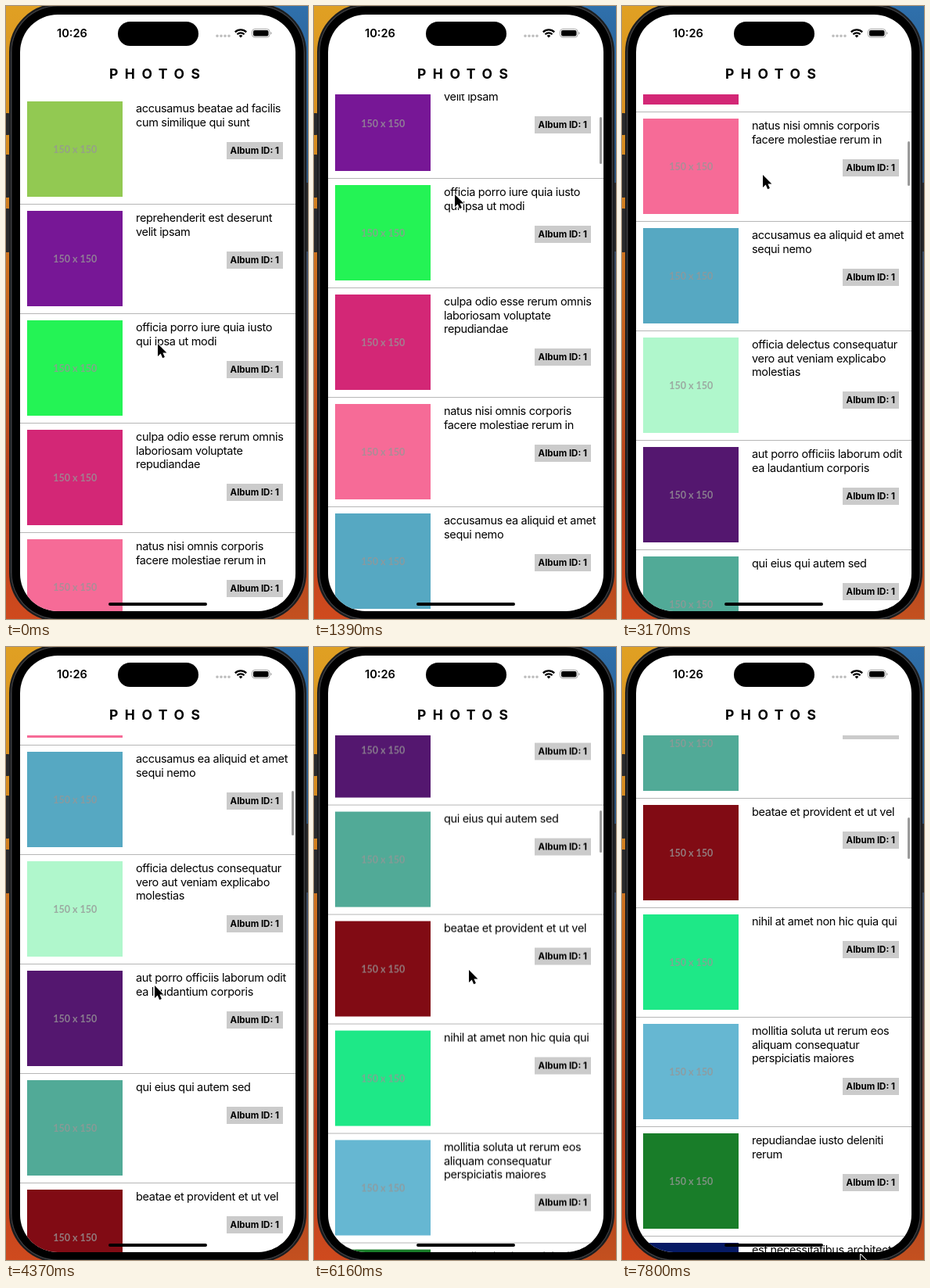
These frames come from a looping animation (386x784 px, 8000 ms). An HTML page:

```html
<!DOCTYPE html>
<html lang="en">
<head>
<meta charset="utf-8">
<title>Photos</title>
<style>
  html, body { margin: 0; width: 100%; height: 100%; overflow: hidden; }
  body {
    position: relative; color: #000; font-family: Inter, "Liberation Sans", sans-serif;
    background:
      linear-gradient(#2f70ac, #28527c 25%, #4a4550 55%, #a8421f 85%, #c4501f) right / 50% 100% no-repeat,
      linear-gradient(#e0a023, #d58a20 25%, #c9651f 50%, #b8401c 78%, #cf4a1e);
  }
  body *, .row::after { position: absolute; box-sizing: border-box; white-space: pre; }
  .key { left: -3px; width: 8px; border-radius: 2px; background: #292a2c; }
  #phone {
    left: 4px; top: -3px; width: 380px; height: 790px; border-radius: 62px;
    background: #000; border: 2px solid #1d1e20; box-shadow: inset 0 0 0 1.5px #3c3d40;
  }
  #screen {
    left: 18px; top: 11px; width: 352px; height: 763px; border-radius: 48px;
    background: #fff; overflow: hidden;
  }
  #view { left: 0; top: 102px; width: 352px; height: 661px; overflow: hidden; }
  #list { left: 0; top: 0; width: 352px; will-change: transform; }
  .row { left: 0; width: 352px; height: 140px; }
  .row::after { content: ""; left: 0; top: 140px; width: 352px; height: 1px; background: #b6b6b6; }
  .pic {
    left: 9px; top: 9px; width: 122.4px; height: 122.4px; text-align: center;
    font: 700 12.5px/124px Lato, sans-serif; color: rgba(150, 150, 150, .8);
  }
  .name { left: 148px; top: 9.3px; font-size: 14.5px; line-height: 17.5px; letter-spacing: -.33px; }
  .tag {
    left: 263.5px; width: 72.5px; height: 22px; background: #cbcbcb;
    text-align: center; font-weight: 700; font-size: 11.5px; line-height: 22px;
  }
  #bar { left: 347px; width: 2.8px; border-radius: 2px; background: #9b9b9b; }
  #title { left: 132px; top: 76px; font-weight: 700; font-size: 17.5px; line-height: 22px; letter-spacing: 8.5px; }
  #clock { left: 65px; top: 26px; font-weight: 600; font-size: 14.6px; line-height: 18px; }
  #island { left: 143px; top: 20px; width: 103px; height: 31px; border-radius: 16px; background: #000; }
  #home { left: 131px; top: 763px; width: 126px; height: 4px; border-radius: 2px; background: #000; }
  #status, #cursor { left: 0; top: 0; overflow: visible; }
</style>
</head>
<body>
<div class="key" style="top:137px;height:28px"></div>
<div class="key" style="top:190px;height:55px"></div>
<div class="key" style="top:259px;height:56px"></div>
<div class="key" style="left:381px;top:226px;height:88px"></div>
<div id="phone"></div>
<div id="screen">
  <div id="view"><div id="list"></div><div id="bar"></div></div>
</div>
<div id="clock">10:26</div>
<div id="island"></div>
<div id="title">PHOTOS</div>
<svg id="status" width="386" height="60">
  <path d="M270 38.3h16" stroke="#bdbdbd" stroke-width="3.6" stroke-linecap="round" stroke-dasharray="0 5"/>
  <g fill="none" stroke="#000" stroke-width="2.2">
    <path d="M292.8 33.4a10.3 10.3 0 0 1 14.4 0M295.4 36.2a6.6 6.6 0 0 1 9.2 0"/>
  </g>
  <path d="M297.6 38a3.6 3.6 0 0 1 4.8 0L300 40.6z"/>
  <rect x="314.5" y="29.5" width="22.5" height="10.5" rx="3.4" fill="none" stroke="#a2a2a2"/>
  <rect x="316" y="31" width="19.5" height="7.5" rx="2"/>
  <path d="M338.3 33v3.6q1.4-.5 1.4-1.8t-1.4-1.8" fill="#a2a2a2"/>
</svg>
<div id="home"></div>
<svg id="cursor" width="16" height="22">
  <path d="M0 0V16L3.7 12.6L6.2 18.3L8.9 17.1L6.4 11.6H11.4Z" stroke="#fff" stroke-width="1.8"
    paint-order="stroke" stroke-linejoin="round"/>
</svg>
<script>
const $ = id => document.getElementById(id);

const photos = `92c952 accusamus beatae ad facilis/cum similique qui sunt
771796 reprehenderit est deserunt/velit ipsam
24f355 officia porro iure quia iusto/qui ipsa ut modi
d32776 culpa odio esse rerum omnis/laboriosam voluptate/repudiandae
f66b97 natus nisi omnis corporis/facere molestiae rerum in
56a8c2 accusamus ea aliquid et amet/sequi nemo
b0f7cc officia delectus consequatur/vero aut veniam explicabo/molestias
54176f aut porro officiis laborum odit/ea laudantium corporis
51aa97 qui eius qui autem sed
810b14 beatae et provident et ut vel
1ee887 nihil at amet non hic quia qui
66b7d2 mollitia soluta ut rerum eos/aliquam consequatur/perspiciatis maiores
197d29 repudiandae iusto deleniti/rerum
061a65 est necessitatibus architecto/ut laborum`.split("\n");

$("list").innerHTML = photos.map((p, i) => {
  const lines = p.slice(7).split("/");
  return `<div class="row" style="top:${i * 140}px">` +
    `<div class="pic" style="background:#${p.slice(0, 6)}">150 x 150</div>` +
    `<div class="name">${lines.join("\n")}</div>` +
    `<div class="tag" style="top:${25.6 + lines.length * 17.5}px">Album ID: 1</div></div>`;
}).join("");

// Pointer path: tick, x, y
const path = [
  [-1, 194, 432], [1, 190, 395], [3, 181, 284], [4, 180, 258], [6, 180, 241],
  [8, 180, 241], [9, 185, 300], [11, 208, 570], [12, 213, 585], [13, 212, 523],
  [15, 197, 330], [16, 188, 262], [18, 180, 216],
  [20, 180, 216], [21, 185, 300], [22, 199, 520], [23, 203, 602],
  [24, 203, 602], [26, 190, 433], [27, 184, 355], [28, 180, 300], [30, 179, 261],
  [31, 179, 261], [32, 182, 300], [34, 203, 580], [35, 206, 605],
  [38, 198, 413], [39, 193, 340], [40, 190, 300], [42, 188, 277],
  [45, 188, 277], [46, 195, 320], [48, 270, 650], [49, 305, 777], [60, 305, 777]
];

// Drags: first and last tick, pointer y and scroll offset at both ends
const drags = [
  [0, 6, 414, 241, 0, 173], [12, 18, 585, 216, 173, 538],
  [24, 30, 583, 261, 538, 860], [35, 42, 570, 277, 860, 1180]
];

function pointer(tick) {
  const n = path.findIndex(p => p[0] > tick), a = path[n - 1], b = path[n];
  const u = (tick - a[0]) / (b[0] - a[0]);
  return a.map((v, i) => v + (b[i] - v) * u);
}

function offset(tick, y) {
  const drag = drags.findLast(d => d[0] <= tick);
  if (!drag) return 0;
  const [, end, y0, y1, s0, s1] = drag;
  const u = tick > end ? 1 : Math.min(1, Math.max(0, (y0 - y) / (y0 - y1)));
  return s0 + (s1 - s0) * u;
}

function draw(ms) {
  // The picture advances in ticks of about 149 ms
  const tick = Math.max(-1, Math.floor((ms % 8000 - 485) / 149));
  const [, x, y] = pointer(tick), s = offset(tick, y);
  $("list").style.transform = `translateY(${-s}px)`;
  $("cursor").style.transform = `translate(${x}px, ${y}px)`;
  const bar = $("bar").style;
  bar.visibility = tick > 0 ? "visible" : "hidden";
  bar.top = 2.5 + .0925 * s - 1.25e-5 * s * s + 11 + "px";
  bar.height = 61.5 - .007 * s + "px";
}

let start;
function loop(now) {
  start ??= now;
  draw(now - start);
  requestAnimationFrame(loop);
}
draw(0);
requestAnimationFrame(loop);
</script>
</body>
</html>
```
